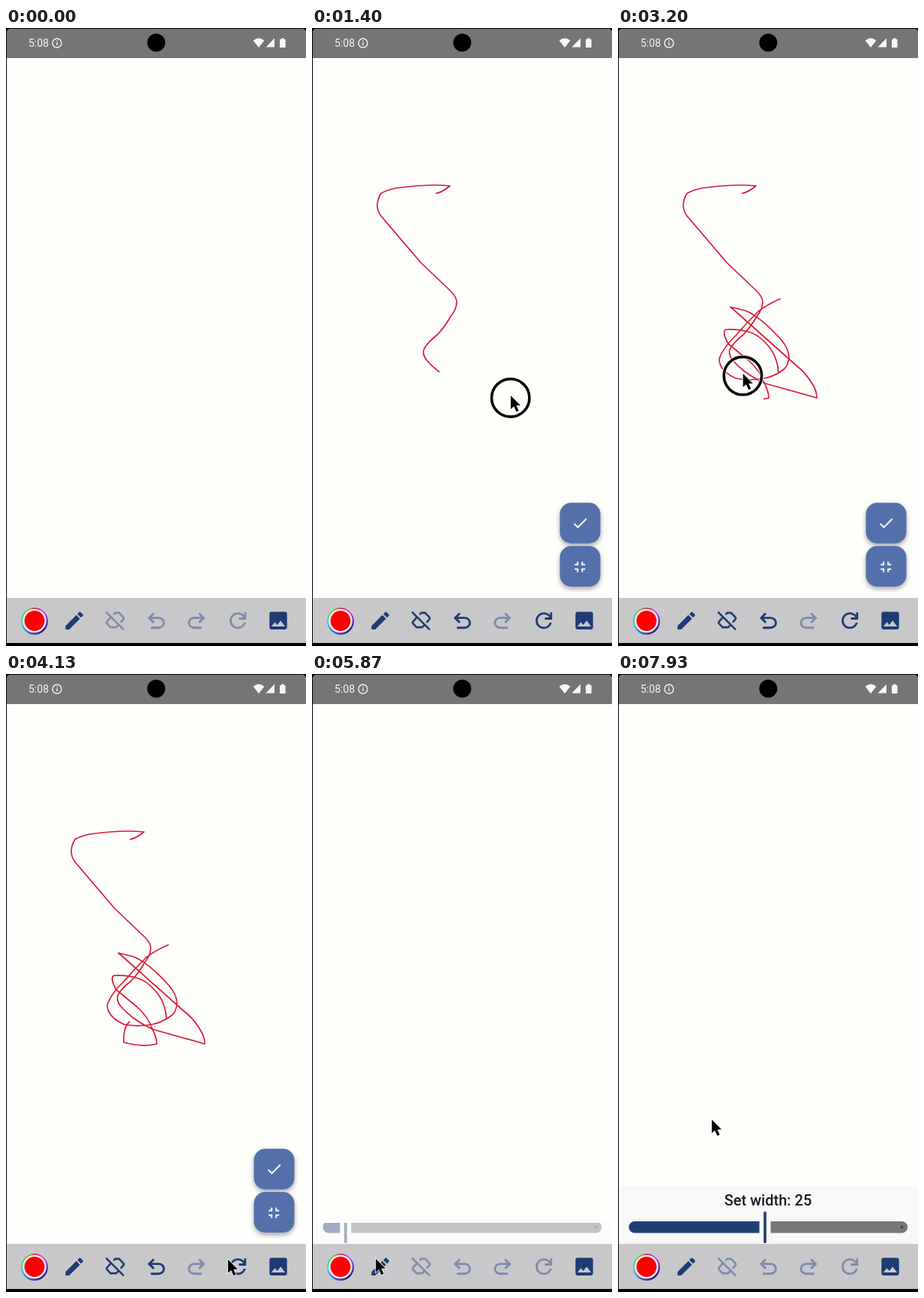
An HTML page for the animation above (8000 ms loop, 400 by 822 pixels).

```html
<!DOCTYPE html>
<html lang="en">
<head>
<meta charset="utf-8">
<title>Drawing app</title>
<style>
  html, body { margin: 0; width: 100%; height: 100%; overflow: hidden; background: #fefefb; }
  svg { display: block; width: 100%; height: 100%; font-family: Roboto, sans-serif; }
  .ring {
    width: 36px; height: 36px; border-radius: 50%;
    background: conic-gradient(#d03060, #e040e0 45deg, #6030c0 90deg, #20207a 140deg, #4060c0 200deg,
      #40d0e8 260deg, #40d860 305deg, #a0a040 340deg, #d03060);
  }
  .icon { fill: #1f3b74; }
  .line { fill: none; stroke: #1f3b74; stroke-width: 2; }
  .off .icon, .icon.off { fill: #7f8baf; }
  .off .line { stroke: #7f8baf; }
  .ink { fill: none; stroke: #d81c34; stroke-width: 1.7; stroke-linejoin: round; }
  .fab { fill: #5370aa; filter: drop-shadow(0 3px 3px #50505880); }
  .glyph { fill: #f8f8fa; }
</style>
</head>
<body>
<svg viewBox="0 0 400 822" preserveAspectRatio="none">
  <defs>
    <path id="back" d="M7 19v-2h7.1q1.575 0 2.738-1T18 13.5 16.838 11 14.1 10H7.8l2.6 2.6L9 14 4 9l5-5 1.4 1.4L7.8 8h6.3q2.425 0 4.163 1.575T20 13.5t-1.737 3.925T14.1 19z"/>
    <clipPath id="reveal"><rect id="revealBox" x="0" width="400" height="78"/></clipPath>
  </defs>

  <rect width="400" height="822" fill="#000"/>
  <path d="M1 818V7q0-6 6-6h387q6 0 6 6v811z" fill="#fefefb"/>

  <path d="M1 40V7q0-6 6-6h387q6 0 6 6v33z" fill="#757575"/>
  <g fill="#f6f6f4">
    <text x="30" y="24.7" font-size="14">5:08</text>
    <circle cx="68" cy="20" r="6" fill="none" stroke="#f6f6f4" stroke-width="1.4"/>
    <path d="M67.3 19h1.4v4h-1.4zM67.3 16.4h1.4v1.4h-1.4z"/>
    <path d="M337 26l-7.3-9.2q7.3-6.6 14.6 0zM346.5 25.5h11.5v-12zM365 15h2v-1.6h3.6V15h2v11H365z"/>
  </g>
  <circle cx="200.3" cy="19.5" r="12" fill="#000"/>

  <path id="inkOne" class="ink"/>
  <path id="inkTwo" class="ink"/>

  <g id="fabs">
    <rect class="fab" x="330.5" y="631.5" width="54" height="54" rx="15"/>
    <rect class="fab" x="330.5" y="689" width="54" height="54" rx="15"/>
    <path class="glyph" transform="translate(345.5 646.5)" d="M9 16.17L4.83 12l-1.42 1.41L9 19 21 7l-1.41-1.41z"/>
    <path class="glyph" transform="translate(345.2 704.7)" d="M5 16h3v3h2v-5H5zm3-8H5v2h5V5H8zm6 11h2v-3h3v-2h-5zm2-11V5h-2v5h5V8z"/>
  </g>

  <g id="sheet" clip-path="url(#reveal)">
    <rect x="1" y="681" width="399" height="77" fill="#f8f8f8"/>
    <text id="label" x="200" y="707" text-anchor="middle" font-size="20" font-weight="500" fill="#1b1b1d"></text>
    <path id="active" fill="#1f3f74"/>
    <path id="inactive" fill="#77777a"/>
    <circle cx="378.5" cy="735.7" r="2" fill="#44464c"/>
    <rect id="thumb" y="715" height="42" rx="1.5" fill="#2f4270"/>
  </g>

  <rect x="1" y="758" width="399" height="60" fill="#c8c8ca"/>
  <foreignObject x="20" y="770.5" width="36" height="36"><div class="ring"></div></foreignObject>
  <circle cx="38" cy="788.5" r="15.8" fill="#eeeef0"/>
  <circle cx="38" cy="788.5" r="13.4" fill="#f00"/>
  <path class="icon" transform="translate(75.5 772.8) scale(1.3)" d="M3 17.25V21h3.75L17.81 9.94l-3.75-3.75zM20.71 7.04a1 1 0 000-1.41l-2.34-2.34a1 1 0 00-1.41 0l-1.83 1.83 3.75 3.75z"/>
  <g id="tools">
    <path class="line" transform="translate(130 772.4) scale(1.3)" d="M2.5 3.2L20.8 21.5M7.8 8.5L3.6 13.2q-.8 1 0 2L7.3 19H13l2.6-2.7M10.3 5.8L12.2 4.2H16L20.3 8.6q1 1.2 0 2.4L17.6 14"/>
    <use href="#back" class="icon" transform="translate(183 771.6) scale(1.45)"/>
    <path class="icon" transform="translate(292.6 771.7) scale(1.38)" d="M12 20q-3.35 0-5.675-2.325T4 12t2.325-5.675T12 4q1.725 0 3.3.713T18 6.75V4h2v7h-7V9h4.2q-.8-1.4-2.187-2.2T12 6Q9.5 6 7.75 7.75T6 12t1.75 4.25T12 18q1.925 0 3.475-1.1T17.65 14h2.1q-.7 2.65-2.85 4.325T12 20"/>
  </g>
  <use href="#back" class="icon off" transform="translate(271.4 771.6) scale(-1.45 1.45)"/>
  <path class="icon" transform="translate(347.4 772.6) scale(1.3)" d="M21 19V5c0-1.1-.9-2-2-2H5c-1.1 0-2 .9-2 2v14c0 1.1.9 2 2 2h14c1.1 0 2-.9 2-2zM8.5 13.5l2.5 3.01L14.5 12l4.5 6H5z"/>

  <g id="pointer">
    <g id="press" fill="none" transform="translate(-.3 .7)">
      <circle r="25.2" stroke="#fff" stroke-width="5.5"/>
      <circle r="25.2" stroke="#000" stroke-width="3.6"/>
    </g>
    <path transform="translate(0 -2.2)" d="M0 0V18L4.2 14.2 7.4 21.4 10.6 20 7.4 13H13z" stroke="#fff" stroke-width="1.6" paint-order="stroke" fill="#000"/>
  </g>
</svg>

<script>
const LOOP = 8000, LAG = 178, CLEAR_AT = 4310, SHEET_AT = 5790;
const $ = id => document.getElementById(id);
const show = (id, on) => $(id).style.display = on ? '' : 'none';
const clamp = v => Math.min(1, Math.max(0, v));
const smooth = p => p * p * (3 - 2 * p);

const firstHalf = 'M165 220Q173 219 184 210Q155 207 112 213Q98 216 92 220Q87 228 87 237Q88 245 92 250L145 312 185 350' +
  'Q193 358 193 365Q192 375 186 382Q176 399 167 408Q152 420 149 428Q147 434 153 442Q160 450 169 457Q183 467 197 473L265 492';
const secondHalf = 'Q265 483 260 475Q250 458 239 450L150 371 170 376Q190 384 217 414Q228 427 228 438Q227 449 221 454' +
  'Q207 465 189 467Q170 469 157 466Q135 456 135 440Q140 425 158 408Q170 394 187 377Q200 367 217 360';
const loopStroke = 'M214 459Q213 440 203 426Q188 407 173 404Q160 400 144 401Q138 404 147 420L175 443Q190 457 194 470' +
  'Q201 483 201 492Q183 497 157 490Q156 470 165 462';

const inkOne = $('inkOne'), inkTwo = $('inkTwo');
inkOne.setAttribute('d', firstHalf);
const corner = inkOne.getTotalLength();
inkOne.setAttribute('d', firstHalf + secondHalf);
inkTwo.setAttribute('d', loopStroke);
const endOne = inkOne.getTotalLength(), endTwo = inkTwo.getTotalLength();

// Pen travel along each stroke, in pixels
const travelOne = t => t < 1400 ? clamp((t - 500) / 900) * corner
  : corner + clamp((t - 1400) / 700) * (endOne - corner);
const travelTwo = t => clamp((t - 2440) / 760) * endTwo;

// Pointer stops: time, x, y, linear
const stops = [
  [130, -10, 300], [460, 165, 220], [2130, 217, 360], [2330, 225, 457], [2420, 214, 459],
  [3300, 165, 462], [4000, 296, 781], [4600, 296, 781], [5450, 85, 780], [6030, 85, 780],
  [6450, 46, 735], [6550, 46, 735], [6800, 88, 735, 1], [7350, 196, 735, 1], [7500, 196, 735],
  [7930, 125, 595], [8000, 125, 595]
];
const presses = [[490, 2110], [2430, 3210], [4200, 4330], [5640, 5770], [6480, 7490]];

function pointerAt(t) {
  if (t > 500 && t < 2100) return inkOne.getPointAtLength(travelOne(t));
  if (t > 2440 && t < 3200) return inkTwo.getPointAtLength(travelTwo(t));
  const i = Math.max(1, stops.findIndex(s => s[0] >= t));
  const a = stops[i - 1], b = stops[i];
  const p = clamp((t - a[0]) / (b[0] - a[0]));
  const k = b[3] ? p : smooth(p);
  return { x: a[1] + (b[1] - a[1]) * k, y: a[2] + (b[2] - a[2]) * k };
}

function drawInk(path, length, visible) {
  path.style.display = visible && length > 0 ? '' : 'none';
  path.style.strokeDasharray = length + ' 3000';
}

function drawSlider(t) {
  show('sheet', t > SHEET_AT);
  const p = clamp((t - SHEET_AT) / 400), open = 1 - (1 - p) * (1 - p);
  $('sheet').style.opacity = 0.1 + 0.9 * open;
  $('revealBox').setAttribute('y', 758 - 77 * open);
  const value = t < 6550 + LAG ? 5 : Math.round((pointerAt(Math.min(t - LAG, 7400)).x - 7) / 7.56);
  const x = 7 + 7.56 * value;
  const held = t > 6480 && t < 7490, width = held ? 2 : 3.8, gap = held ? 6.5 : 7.5;
  $('label').textContent = 'Set width: ' + value;
  $('thumb').setAttribute('x', x - width / 2);
  $('thumb').setAttribute('width', width);
  $('active').setAttribute('d', `M${x - gap} 728V743.5H22.2a7.75 7.75 0 010-15.5z`);
  $('inactive').setAttribute('d', `M${x + gap} 728H378.5a7.75 7.75 0 010 15.5H${x + gap}z`);
}

function render(t) {
  const drawn = t > 500 && t < CLEAR_AT;
  drawInk(inkOne, travelOne(t - LAG), drawn);
  drawInk(inkTwo, travelTwo(t - LAG), drawn);
  show('fabs', drawn);
  $('tools').setAttribute('class', drawn ? '' : 'off');
  drawSlider(t);
  const { x, y } = pointerAt(t);
  show('pointer', t > 130);
  $('pointer').setAttribute('transform', `translate(${x} ${y})`);
  show('press', presses.some(([from, to]) => t >= from && t < to));
}

const start = performance.now();
function tick() {
  render((performance.now() - start) % LOOP);
  requestAnimationFrame(tick);
}
tick();
</script>
</body>
</html>
```
